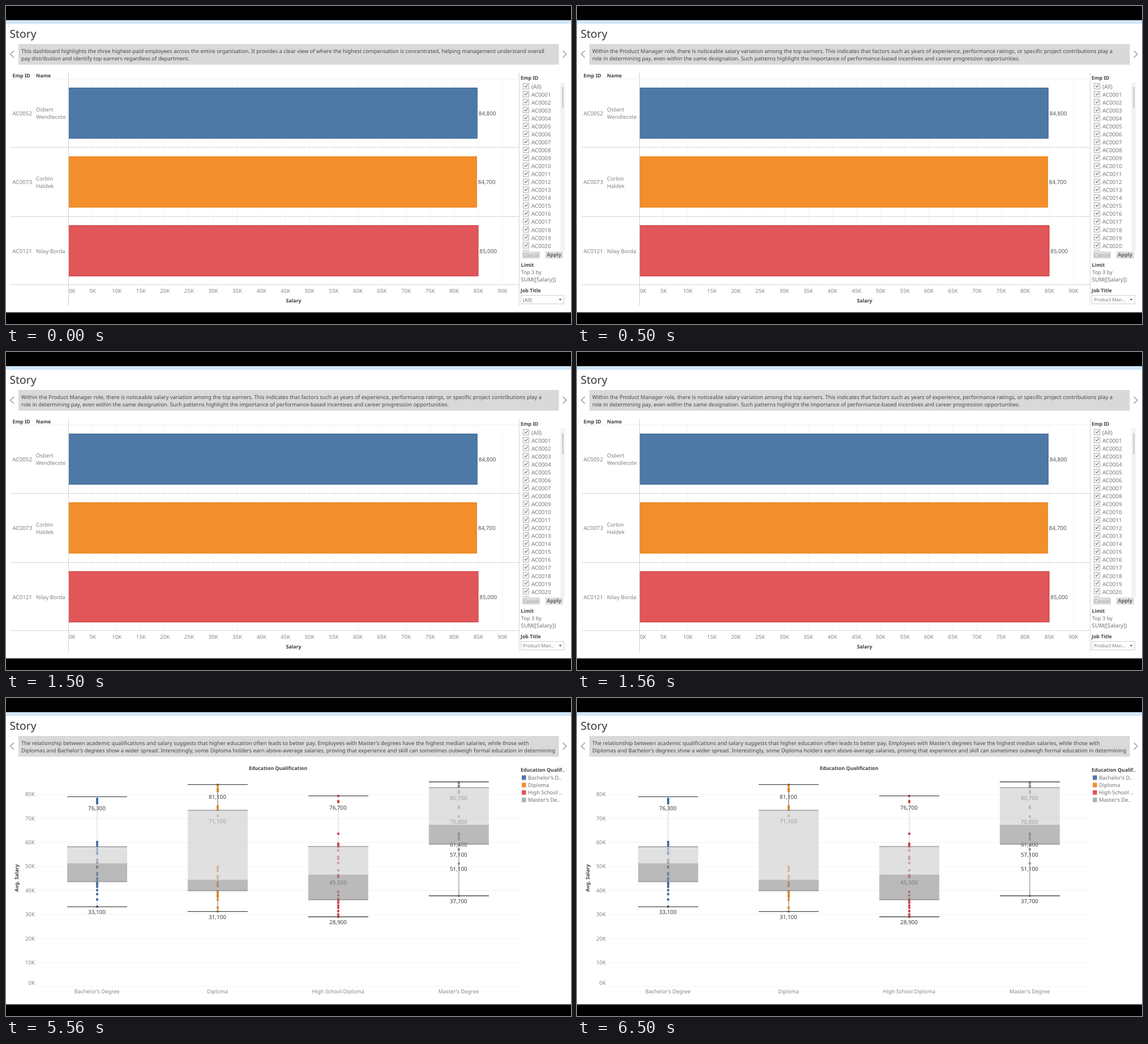
These frames come from a looping animation (998x561 px, 8000 ms). An HTML page:

```html
<!DOCTYPE html>
<html lang="en">
<head>
<meta charset="utf-8">
<title>Salary story</title>
<style>
  html, body { margin: 0; width: 100%; height: 100%; overflow: hidden; background: #fff; }
  svg { display: block; width: 100%; height: 100%; }
  text { font-family: "Noto Sans", "Open Sans", sans-serif; text-rendering: geometricPrecision; white-space: pre; }
  .bold { font-weight: 700; }
  #top, #role, #bars, #boxes { animation: 8s step-end infinite; }
  #top { animation-name: top; }
  #role { animation-name: role; }
  #bars { animation-name: bars; }
  #boxes { animation-name: boxes; }
  @keyframes top { 0% { opacity: 1 } 6.25%, 100% { opacity: 0 } }
  @keyframes role { 0% { opacity: 0 } 6.25% { opacity: 1 } 68.75%, 100% { opacity: 0 } }
  @keyframes bars { 0% { opacity: 1 } 68.75%, 100% { opacity: 0 } }
  @keyframes boxes { 0% { opacity: 0 } 68.75%, 100% { opacity: 1 } }
</style>
</head>
<body>
<svg viewBox="0 0 998 561" preserveAspectRatio="none">
  <defs><clipPath id="list"><rect x="908" y="134" width="70" height="298"/></clipPath></defs>
  <g id="frame"></g>
  <g id="bars"></g>
  <g id="top"></g>
  <g id="role"></g>
  <g id="boxes"></g>
</svg>
<script>
const NS = 'http://www.w3.org/2000/svg';
let layer;
const use = id => { layer = document.getElementById(id); };

function add(tag, attrs, parent = layer) {
  const el = document.createElementNS(NS, tag);
  for (const k in attrs) el.setAttribute(k, attrs[k]);
  return parent.appendChild(el);
}
const rect = (x, y, width, height, fill, more) => add('rect', { x, y, width, height, fill, ...more });
const line = (x1, y1, x2, y2, stroke, w = 1) => add('line', { x1, y1, x2, y2, stroke, 'stroke-width': w });
const path = (d, stroke, w = 1) => add('path', { d, stroke, 'stroke-width': w, fill: 'none' });

// y is the middle of the capitals
function text(str, x, y, size = 9.45, fill = '#808080', more = {}) {
  const el = add('text', { x, y: y + size * 0.357, 'font-size': size, fill, ...more });
  el.textContent = str;
  return el;
}
const MID = { 'text-anchor': 'middle' };
const END = { 'text-anchor': 'end' };
const BOLD = { class: 'bold' };
const head = (str, x, y, more) => text(str, x, y, 8.8, '#404040', { ...BOLD, ...more });
const caption = (a, b) => [a, b].forEach((s, i) => text(s, 27, 79.2 + i * 13.5, 9.454, '#484848'));

function drawFrame() {
  use('frame');
  rect(0, 0, 998, 561, '#fff');
  rect(0, 25, 998, 6.5, '#d2e7f9');
  rect(0, 0, 998, 25, '#000');
  rect(0, 540.5, 998, 20.5, '#000');
  text('Story', 6.5, 49.5, 19.3, '#333');
  rect(22, 67, 954.5, 36.5, '#d9d9d9');
  path('M14 79L7.5 85L14 91M983.5 79L990 85L983.5 91', '#8f8f8f', 1.2);
}

function drawBars() {
  use('bars');
  const x0 = 110.5, step = 42.58;
  for (let i = 0; i <= 18; i++) {
    const x = x0 + i * step;
    if (i) line(x, 129, x, 491, '#f4f4f4');
    text(i * 5 + 'K', i ? x : 111, 503, 9.6, '#858585', i ? MID : {});
  }
  line(8, 128.5, 906, 128.5, '#efefef');
  [249.5, 371.5, 491.5].forEach(y => line(8, y, 906, y, '#d4d4d4'));

  const rows = [
    ['AC0052', ['Osbert', 'Wendlecote'], 84.8, '#4e79a7', '#3c6592'],
    ['AC0073', ['Corbin', 'Haldek'], 84.7, '#f28e2b', '#ea8520'],
    ['AC0121', ['Nilay Borda'], 85, '#e15759', '#c43f48']
  ];
  rows.forEach(([id, name, pay, fill, edge], i) => {
    const y = 189 + i * 121.4, w = pay / 5 * step;
    rect(x0, y - 45, w, 90, fill);
    path(`M${x0} ${y - 44.5}h${w - 0.5}v89H${x0}`, edge);
    text(id, 11.5, y + 0.5, 9.75);
    name.forEach((n, j) => text(n, 53, y + 0.6 + (j - (name.length - 1) / 2) * 13, 9.5));
    text((pay * 1000).toLocaleString('en-US'), x0 + w + 2, y + 0.2, 9.85, '#555');
  });
  line(x0, 118, x0, 528.5, '#cfcfcf');
  line(906.5, 118, 906.5, 528.5, '#d4d4d4');
  head('Emp ID', 11.5, 122.5);
  head('Name', 53, 122.5);
  head('Salary', 508, 519.5, MID);
  drawFilters();
}

function drawFilters() {
  head('Emp ID', 909, 127.3);
  const bars = layer;
  layer = add('g', { 'clip-path': 'url(#list)' });
  for (let i = 0; i <= 21; i++) {
    const y = 142.5 + i * 14.03;
    rect(913.5, y - 6, 10, 10, '#fff', { stroke: '#a8a8a8' });
    path(`M916 ${y - 1.5}l2 2.2l3.6 -4.6`, '#666', 1.1);
    if (i < 21) text(i ? 'AC' + String(i).padStart(4, '0') : '(All)', 928, y, i ? 9.75 : 10.2, '#777');
  }
  layer = bars;
  rect(979, 135, 8.5, 297, '#f3f3f3');
  rect(982, 143, 3, 37.5, '#d0d0d0');
  rect(912, 433, 31, 12.5, '#dcdcdc');
  text('Cancel', 927.5, 439.2, 9.3, '#a6a6a6', MID);
  rect(952.5, 433, 31.5, 12.5, '#dedede');
  text('Apply', 968, 439.2, 9.1, '#666', { ...BOLD, ...MID });
  head('Limit', 909.5, 457);
  text('Top 3 by', 910, 470, 9.2, '#707070');
  text('SUM([Salary])', 909.5, 483, 9.8, '#707070');
  head('Job Title', 909, 502.3);
  rect(909.5, 510.5, 76, 15, '#fff', { stroke: '#d0d0d0' });
  add('path', { d: 'M976.5 516.8h5l-2.5 3z', fill: '#555' });
}

function drawSteps() {
  use('top');
  caption(
    'This dashboard highlights the three highest-paid employees across the entire organisation. It provides a clear view of where the highest compensation is concentrated, helping management understand overall',
    'pay distribution and identify top earners regardless of department.');
  text('(All)', 913, 518.3, 9.2, '#777');
  use('role');
  caption(
    'Within the Product Manager role, there is noticeable salary variation among the top earners. This indicates that factors such as years of experience, performance ratings, or specific project contributions play a',
    'role in determining pay, even within the same designation. Such patterns highlight the importance of performance-based incentives and career progression opportunities.');
  text('Product Man...', 913, 518.3, 8.2, '#777');
}

// low, quartile, median, quartile, high as y; dots as y; labels as salary in thousands
const groups = [
  { name: 'Bachelor’s Degree', key: 'Bachelor’s D..', fill: '#4e79a7', dot: '#3f6da0', stem: ['#cfcfcf', '#cfcfcf'],
    box: [368.3, 324, 291.5, 262.5, 174.2],
    dots: [178, 180, 183, 185.7, 254, 258, 262, 267, 272, 275, 285.5, 290, 297, 299, 309, 312, 318, 321, 326, 329, 333, 339, 346, 355.5, 368],
    labels: [76.3, 33.1] },
  { name: 'Diploma', key: 'Diploma', fill: '#f28e2b', dot: '#dc842f', stem: ['#666', '#777'],
    box: [376.7, 340, 320.5, 198, 152.7],
    dots: [153, 155, 160, 162, 164.5, 191, 194, 198, 207.7, 297.5, 301, 305, 314, 318, 325, 329, 332, 341, 344, 348, 351, 356, 370, 376.5],
    labels: [81.1, 71.1, 31.1] },
  { name: 'High School Diploma', key: 'High School ..', fill: '#e15759', dot: '#d0414c', stem: ['#cfcfcf', '#aaa'],
    box: [386, 356, 311.5, 262, 172.7],
    dots: [172.7, 182, 183.5, 239.5, 257, 260, 263, 269, 280, 284, 291, 304, 313, 316, 342, 348, 354, 357, 361, 366, 370, 376, 382, 386],
    labels: [76.7, 45.5, 28.9] },
  { name: 'Master’s Degree', key: 'Master’s De..', fill: '#a9b1b8', dot: '#84939b', stem: ['#bbb', '#808080'],
    box: [349, 258, 223.5, 158, 148],
    dots: [148.5, 150.5, 155, 157, 164, 167, 191.5, 194, 209, 239, 242, 247, 249.5, 267, 292, 349],
    labels: [80.7, 70.8, 61.4, 57.1, 51.1, 37.7] }
];

function drawBoxes() {
  use('boxes');
  caption(
    'The relationship between academic qualifications and salary suggests that higher education often leads to better pay. Employees with Master’s degrees have the highest median salaries, while those with',
    'Diplomas and Bachelor’s degrees show a wider spread. Interestingly, some Diploma holders earn above-average salaries, proving that experience and skill can sometimes outweigh formal education in determining');
  head('Education Qualification', 480.7, 123.8, MID);
  head('Avg. Salary', 0, 0, { ...MID, transform: 'translate(19 317.5) rotate(-90)' });

  const yOf = k => 508.8 - k * 4.235;
  for (let k = 0; k <= 80; k += 10) {
    line(55, yOf(k), 908, yOf(k), '#f2f2f2');
    text(k + 'K', 51, k ? yOf(k) : 502.5, 9.6, '#858585', END);
  }

  head('Education Qualif..', 909, 127.3);
  groups.forEach((g, i) => {
    const x = 161 + i * 212.95, [low, q1, med, q3, high] = g.box;
    const cell = (y, h, fill) => rect(x - 53, y, 106, h, fill, { opacity: 0.65 });
    line(x, high, x, q3, g.stem[0]);
    line(x, q1, x, low, g.stem[1]);
    g.dots.forEach(cy => add('circle', { cx: x, cy, r: 2.2, fill: g.dot }));
    g.labels.forEach(k =>
      text((k * 1000).toLocaleString('en-US'), x - 0.5, yOf(k) + 9.3, 9.85, '#3c3c3c', MID));
    cell(q3, med - q3, '#cfcfcf');
    cell(med, q1 - med, '#959595');
    [q3, q1].forEach(y => line(x - 53, y, x + 53, y, '#777'));
    [low, high].forEach(y => line(x - 53, y, x + 53, y, '#4a4a4a', 1.3));
    text(g.name, x - 0.3, 517.5, 9.4, '#858585', MID);
    const y = 140.5 + i * 13.1;
    rect(911, y - 4, 7.5, 8, g.fill);
    text(g.key, 922, y + 0.2, 9.4, '#707070');
  });
}

drawFrame();
drawBars();
drawSteps();
drawBoxes();
</script>
</body>
</html>
```
